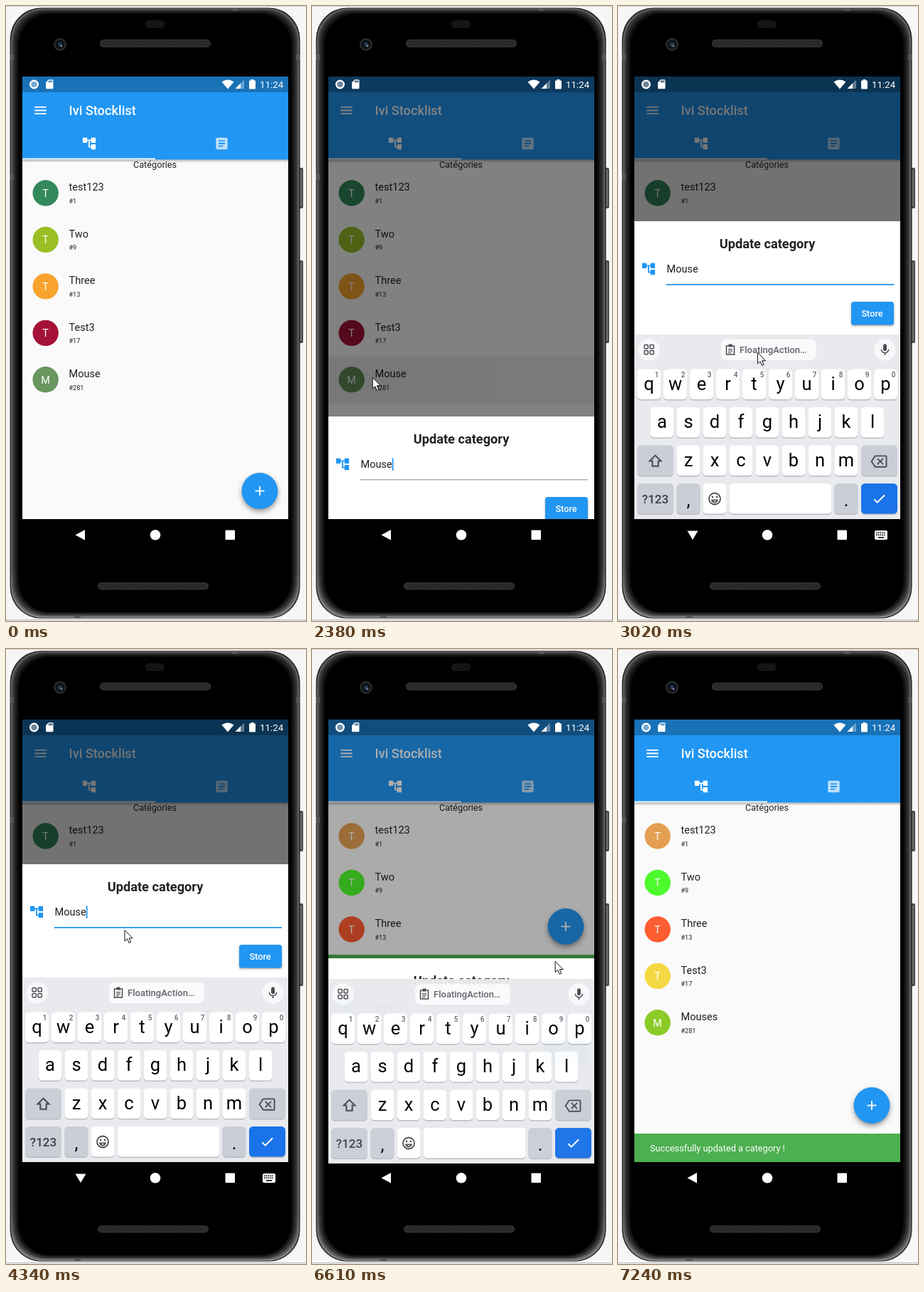
Animation, 422 px wide and 863 px high, one loop 8000 ms. Source, as an HTML page with a canvas:

```html
<!DOCTYPE html>
<html lang="en">
<head>
<meta charset="utf-8">
<title>Category update</title>
<style>
html, body { margin: 0; width: 100%; height: 100%; overflow: hidden; background: #f6f6f6; }
canvas { display: block; }
</style>
</head>
<body>
<canvas id="stage" width="422" height="863"></canvas>
<script>
const W = 422, H = 863, LOOP = 8000;
const LEFT = 23, TOP = 99, RIGHT = 397, BOTTOM = 720, SCREEN_END = 764;
const BAR_END = 215.4, KB_TOP = 461, SHEET_H = 159, SNACK_H = 40;
const BLUE = '#2196f3', INK = '#212121', GREY = '#4a4d51';
const OPEN = 2380, TYPED = 4680, CLOSE = 6540;

const ICONS = {
  menu: 'M3 18h18v-2H3v2zm0-5h18v-2H3v2zm0-7v2h18V6H3z',
  tree: 'M22 11V3h-7v3H9V3H2v8h7V8h2v10h4v3h7v-8h-7v3h-2V8h2v3z',
  article: 'M19 3H5c-1.1 0-2 .9-2 2v14c0 1.1.9 2 2 2h14c1.1 0 2-.9 2-2V5c0-1.1-.9-2-2-2zm-5 14H7v-2h7v2zm3-4H7v-2h10v2zm0-4H7V7h10v2z',
  card: 'M18 2h-8L4 8v12c0 1.1.9 2 2 2h12c1.1 0 2-.9 2-2V4c0-1.1-.9-2-2-2zm-6 6h-2V4h2v4zm3 0h-2V4h2v4zm3 0h-2V4h2v4z',
  mic: 'M12 14c1.66 0 3-1.34 3-3V5c0-1.66-1.34-3-3-3S9 3.34 9 5v6c0 1.66 1.34 3 3 3zm5.3-3c0 3-2.54 5.1-5.3 5.1S6.7 14 6.7 11H5c0 3.4 2.7 6.2 6 6.7V21h2v-3.3c3.3-.5 6-3.3 6-6.7z',
  check: 'M9 16.17L4.83 12l-1.42 1.41L9 19 21 7l-1.41-1.41z',
  erase: 'M22 3H7c-.7 0-1.2.35-1.6.9L0 12l5.4 8.1c.4.55.9.9 1.6.9h15c1.1 0 2-.9 2-2V5c0-1.1-.9-2-2-2zm0 16H7.07L2.4 12l4.66-7H22v14zm-11.6-2L14 13.4l3.6 3.6 1.4-1.4-3.6-3.6L19 8.4 17.6 7 14 10.6 10.4 7 9 8.4l3.6 3.6L9 15.6z',
  shift: 'M12 3L2 13h5v7h10v-7h5zM12 5.8l5.2 5.2H15v7H9v-7H6.8z'
};
for (const name in ICONS) ICONS[name] = new Path2D(ICONS[name]);

const ROWS = [
  ['test123', '#1', '#33885c', '#e49f52'],
  ['Two', '#9', '#9abf25', '#4dfa2c'],
  ['Three', '#13', '#f7a32e', '#fd5b30'],
  ['Test3', '#17', '#a51238', '#f4d843'],
  ['Mouse', '#281', '#67965f', '#8acb25']
];

// Keyframes: [time, value, value...], linear between them.
const CURSOR = [
  [210, 386, 837], [500, 270, 650], [760, 165, 515], [990, 120, 471], [1150, 96, 498],
  [1300, 82.5, 520], [1530, 84.5, 521], [2380, 84.5, 521], [2780, 192.5, 482], [3090, 197, 487],
  [3240, 190, 460], [3390, 171, 409], [3560, 169, 402], [3790, 166.5, 394], [4340, 166.5, 394],
  [4560, 165, 390], [4960, 165, 390], [5350, 341.5, 437], [6610, 341.5, 437], [7100, 390, 783]
];
const SHEET = [[OPEN, .906], [2460, 1], [6500, 1], [6610, .17], [6680, 0]];
const SCRIM = [[OPEN, .487], [2460, .54], [6500, .54], [6610, .32], [6770, 0]];
const KB_SHIFT = [[2700, 259], [2780, 65], [2860, 12], [2940, 0], [6570, 0], [6610, 1], [6690, 65], [6790, 259]];
const KB_ALPHA = [[2700, 0], [2780, .5], [2860, .9], [2940, 1], [6570, 1], [6610, .98], [6690, .5], [6770, 0]];
const INSET = [[2800, 0], [2860, 259], [6650, 259], [6700, 0]];
const SNACK = [[CLOSE, 0], [6610, 32], [6690, SNACK_H]];
const RIPPLE = [[1840, 30], [2000, 68], [2379, 68], [OPEN, 172], [2600, 330]];

function track(keys, t) {
  const next = keys.findIndex(k => k[0] > t);
  if (next === 0) return keys[0].slice(1);
  if (next < 0) return keys[keys.length - 1].slice(1);
  const a = keys[next - 1], b = keys[next];
  const p = (t - a[0]) / (b[0] - a[0]);
  return a.slice(1).map((v, i) => v + (b[i + 1] - v) * p);
}
const value = (keys, t) => track(keys, t)[0];

const stage = document.getElementById('stage').getContext('2d');
let c = stage;

function layer(draw) {
  const el = document.createElement('canvas');
  el.width = W;
  el.height = H;
  c = el.getContext('2d');
  draw();
  c = stage;
  return el;
}

function rect(x, y, w, h, fill) {
  c.fillStyle = fill;
  c.fillRect(x, y, w, h);
}

function round(x, y, w, h, r, fill) {
  c.beginPath();
  c.roundRect(x, y, w, h, r);
  c.fillStyle = fill;
  c.fill();
}

function disc(x, y, r, fill) {
  c.beginPath();
  c.arc(x, y, r, 0, 7);
  c.fillStyle = fill;
  c.fill();
}

function poly(points, fill) {
  c.beginPath();
  points.forEach(([x, y]) => c.lineTo(x, y));
  c.closePath();
  c.fillStyle = fill;
  c.fill();
}

function text(str, x, y, size, fill, weight = 400, align = 'left') {
  c.font = `${weight} ${size}px Roboto, sans-serif`;
  c.textAlign = align;
  c.fillStyle = fill;
  c.fillText(str, x, y);
}

function icon(name, x, y, size, fill) {
  c.save();
  c.translate(x - size / 2, y - size / 2);
  c.scale(size / 24, size / 24);
  c.fillStyle = fill;
  c.fill(ICONS[name], 'evenodd');
  c.restore();
}

function shadow(blur, dy, alpha, draw) {
  c.save();
  c.shadowColor = `rgba(0,0,0,${alpha})`;
  c.shadowBlur = blur;
  c.shadowOffsetY = dy;
  draw();
  c.restore();
}

function clipped(x, y, w, h, draw) {
  c.save();
  c.beginPath();
  c.rect(x, y, w, h);
  c.clip();
  draw();
  c.restore();
}

function vertical(y0, y1, ...colours) {
  const g = c.createLinearGradient(0, y0, 0, y1);
  colours.forEach((col, i) => g.addColorStop(i / (colours.length - 1), col));
  return g;
}

function grille(x, y, w, h) {
  round(x, y, w, h, h / 2, '#363636');
  c.save();
  c.beginPath();
  c.roundRect(x + 1, y + 1, w - 2, h - 2, h / 2);
  c.clip();
  c.strokeStyle = '#111';
  c.lineWidth = 1;
  for (let i = -h; i < w; i += 3) {
    c.beginPath();
    c.moveTo(x + i, y + h);
    c.lineTo(x + i + h / 2, y + h / 2);
    c.lineTo(x + i, y);
    c.stroke();
  }
  c.restore();
}

function drawPhone() {
  rect(0, 0, W, H, '#f6f6f6');
  rect(0, 0, W, 1, '#d2d2d2');
  rect(0, 861, W, 1, '#b4b4b4');
  for (const [y, h] of [[227, 57], [357, 116]]) {
    round(412, y, 6, h, 2, '#4a4a4a');
    rect(414, y + 3, 2, h - 6, '#707070');
  }
  const rim = [[0, '#262626', '#3a3a3a'], [1.5, '#606060', '#8c8c8c'], [3.5, '#3a3a3a', '#666'],
    [6, '#242424', '#3c3c3c'], [9, '#101010', '#1c1c1c'], [12, '#000', '#000']];
  for (const [d, side, base] of rim) {
    round(5.6 + d, 2.5 + d * .7, 408 - 2 * d, 857 - 1.4 * d, 44, vertical(790, 858, side, base));
  }
  for (const y of [68, 236]) rect(6, y, 5, 8, '#555');
  rect(408, 68, 5, 8, '#555');
  rect(318, 3, 9, 4, '#555');
  rect(96, 855, 9, 4, '#555');
  round(196, 20, 27, 11, 5.5, '#151515');
  disc(76, 54, 9, '#2a2a2a');
  disc(76, 54, 6.5, '#0d1118');
  disc(76, 54, 3, '#26384c');
  disc(78, 56, 1.5, '#6d8299');
  grille(132, 47, 156, 11);
  grille(129, 809, 156, 10);
}

function key(x, y, w, fill) {
  round(x, y + 1, w, 43, 5.5, '#b9bcc2');
  round(x, y, w, 42.5, 5.5, fill);
}

function letter(ch, x, y) {
  text(ch, x, y, 25.5, '#000', 400, 'center');
}

function drawKeyboard() {
  const shade = '#cbced6';
  rect(LEFT, KB_TOP, RIGHT - LEFT, SCREEN_END - KB_TOP, '#e8eaed');
  disc(43.5, 482.5, 15.2, '#f7f8fa');
  disc(375.5, 482.5, 15.2, '#f7f8fa');
  c.strokeStyle = GREY;
  c.lineWidth = 1.5;
  for (const x of [37, 45]) for (const y of [475.5, 483.5]) {
    c.beginPath();
    c.roundRect(x, y, 5.3, 5.3, 1.3);
    c.stroke();
  }
  icon('mic', 375.5, 482.5, 20, GREY);
  round(145, 467.5, 134, 29.5, 8, '#f9fafb');
  c.strokeRect(152.5, 477, 11, 12);
  rect(155.5, 474.5, 5, 4, GREY);
  for (const y of [481, 483.5, 486]) rect(155, y, y > 485 ? 4 : 6, 1.2, GREY);
  text('FloatingAction…', 171, 487, 13, '#5f6368', 500);

  [...'qwertyuiop'].forEach((ch, i) => {
    const x = 27 + 37 * i;
    key(x, 509.5, 33, '#fff');
    letter(ch, x + 16.5, 539);
    text((i + 1) % 10, x + 27.5, 520.5, 10, '#5f6368', 500, 'center');
  });
  [...'asdfghjkl'].forEach((ch, i) => {
    key(45.5 + 37 * i, 563, 33, '#fff');
    letter(ch, 62 + 37 * i, 592);
  });
  [...'zxcvbnm'].forEach((ch, i) => {
    key(82.5 + 37 * i, 616.5, 33, '#fff');
    letter(ch, 99 + 37 * i, 646);
  });
  key(27, 616.5, 51, shade);
  icon('shift', 52.5, 638.5, 25, GREY);
  key(342, 616.5, 51, shade);
  icon('erase', 367, 639, 23, GREY);

  key(27, 670, 51, shade);
  text('?123', 52.5, 698, 17, '#3c4043', 500, 'center');
  key(82.5, 670, 33, shade);
  letter(',', 99, 702);
  key(119.5, 670, 33, '#fff');
  c.strokeStyle = GREY;
  c.lineWidth = 1.8;
  c.beginPath();
  c.arc(136, 691.5, 8, 0, 7);
  c.stroke();
  disc(133, 689, 1.3, GREY);
  disc(139, 689, 1.3, GREY);
  c.beginPath();
  c.arc(136, 692.5, 4, .2, 2.94);
  c.closePath();
  c.stroke();
  key(156.5, 670, 144, '#fff');
  key(304.5, 670, 33, shade);
  letter('.', 321, 702);
  key(342, 670, 51, '#1a73e8');
  icon('check', 367.5, 691.5, 22, '#fff');
}

function drawBar() {
  rect(LEFT, TOP, 374, 22, '#1971b6');
  rect(LEFT, 121, 374, BAR_END - 121, BLUE);
  icon('menu', 48.5, 146.5, 22, '#fff');
  text('Ivi Stocklist', 88.5, 153, 18.2, '#fff', 500);
  icon('tree', 117, 193, 21.8, '#fff');
  icon('article', 303.5, 193, 21.8, 'rgba(255,255,255,.7)');
  rect(LEFT, BAR_END - 1.8, 187, 1.8, '#fff');
}

function drawStatus() {
  c.strokeStyle = '#fff';
  c.lineWidth = 2.4;
  c.beginPath();
  c.arc(39.5, 110, 5.3, 0, 7);
  c.stroke();
  disc(39.5, 110, 4.5, 'rgba(255,255,255,.4)');
  icon('card', 61.3, 109.8, 15.6, '#fff');
  c.beginPath();
  c.moveTo(312, 116.5);
  c.lineTo(303.5, 106.5);
  c.quadraticCurveTo(312, 100.5, 320.5, 106.5);
  c.fillStyle = '#fff';
  c.fill();
  poly([[322.5, 116], [335, 103.5], [335, 116]], 'rgba(255,255,255,.35)');
  poly([[322.5, 116], [330, 108.5], [330, 116]], '#fff');
  round(342, 104.5, 9, 12, 1, '#fff');
  rect(344.5, 103, 4, 2, '#fff');
  text('11:24', 357, 115, 13.3, '#fff');
}

function drawRowPress(t) {
  if (t < 1840 || t >= 2600) return;
  const fade = t < OPEN ? 1 : (2600 - t) / 220;
  const tint = a => `rgba(0,0,0,${a * fade})`;
  clipped(LEFT, 492, 374, 65.5, () => {
    if (t >= OPEN) rect(LEFT, 492, 374, 66, tint(.05));
    disc(85, 522, value(RIPPLE, t), tint(t < OPEN ? .05 : .02));
  });
}

function drawList(t) {
  const updated = t >= CLOSE;
  rect(LEFT, 215, 374, BOTTOM - 215, '#fafafa');
  text('Catégories', 209.5, 227.3, 12.73, INK, 400, 'center');
  ROWS.forEach(([name, tag, before, after], i) => {
    const y = 262.5 + 65.45 * i;
    disc(55.7, y, 18.2, updated ? after : before);
    text(name[0].toUpperCase(), 55.7, y + 5.2, 14.5, '#fff', 400, 'center');
    text(updated && i === 4 ? name + 's' : name, 88.5, y - 3.3, 14.55, INK);
    text(tag, 88.5, y + 14.3, 9.1, INK);
  });
  drawRowPress(t);
  rect(LEFT, 215, 374, 5, vertical(215, 220, 'rgba(0,0,0,.3)', 'rgba(0,0,0,0)'));
}

function drawFab(y) {
  shadow(7, 3.5, .4, () => disc(357, y, 25.4, BLUE));
  rect(350.5, y - .9, 13, 1.8, '#fff');
  rect(356.1, y - 6.5, 1.8, 13, '#fff');
}

function drawSheet(t, y) {
  rect(LEFT, y, 374, BOTTOM - y + 1, '#fff');
  text('Update category', 210, y + 38, 18.2, INK, 700, 'center');
  icon('tree', 43, y + 67, 21.8, BLUE);
  const word = t < TYPED ? 'Mouse' : 'Mouses';
  text(word, 68.5, y + 72.3, 14.55, INK);
  const blinkStart = t < TYPED ? 2320 : TYPED;
  if (Math.floor((t - blinkStart) / 500) % 2 === 0) {
    rect(68.5 + c.measureText(word).width, y + 58.5, 1.8, 17.5, BLUE);
  }
  if (t >= 2460) rect(68, y + 88, 320, 1.8, BLUE);
  else rect(68, y + 88.3, 320, 1, '#8a8a8a');
  shadow(3, 1.5, .35, () => round(328, y + 113, 60, 32.5, 3.6, BLUE));
  if (t >= 6140 && t < 6700) {
    clipped(328, y + 113, 60, 32.5, () =>
      disc(342, y + 135, 12 + (t - 6140) * .16, 'rgba(255,255,255,.2)'));
  }
  text('Store', 357.5, y + 133.8, 12.73, '#fff', 500, 'center');
}

function drawNav(keyboardOpen) {
  if (keyboardOpen) {
    poly([[97.5, 736.5], [112.5, 736.5], [105, 749]], '#fff');
    round(361, 736, 18, 13, 2, '#fff');
    for (let i = 0; i < 5; i++) for (const y of [738.5, 741.5]) rect(363 + 2.7 * i, y, 1.6, 1.6, '#000');
    rect(366, 745, 8, 1.6, '#000');
  } else {
    poly([[97.5, 742.3], [111, 735], [111, 749.5]], '#fff');
  }
  disc(210, 742.3, 7.3, '#fff');
  round(308.5, 735.5, 13.5, 13.5, 1, '#fff');
}

function drawCursor([x, y]) {
  c.save();
  c.translate(x + .5, y + .5);
  poly([[0, 0], [0, 15.5], [3.6, 12.2], [6, 18], [8.6, 17], [6.2, 11.3], [11, 11.3]], '#fff');
  c.strokeStyle = '#111';
  c.lineWidth = 1;
  c.stroke();
  c.restore();
}

const phone = layer(drawPhone);
const keyboard = layer(drawKeyboard);

function render(t) {
  const bottom = BOTTOM - value(INSET, t);
  const snack = value(SNACK, t);
  c.drawImage(phone, 0, 0);
  clipped(LEFT, TOP, RIGHT - LEFT, BOTTOM - TOP, () => {
    drawList(t);
    drawBar();
    drawFab(bottom - 39.5 - snack);
    if (snack > 0) {
      rect(LEFT, bottom - snack, 374, snack, '#4caf50');
      text('Successfully updated a category !', 45, bottom - snack + 24.5, 12.73, '#fff');
    }
    if (t >= OPEN && t < 6770) {
      rect(LEFT, TOP, 374, BOTTOM - TOP, `rgba(0,0,0,${value(SCRIM, t)})`);
      const open = value(SHEET, t);
      if (open > 0) drawSheet(t, Math.round(bottom - SHEET_H * open));
    }
    drawStatus();
  });
  const alpha = value(KB_ALPHA, t), shift = Math.round(value(KB_SHIFT, t));
  if (alpha > 0) {
    // The panel reaches behind the navigation bar only while it slides.
    const end = shift > 2 ? SCREEN_END : BOTTOM + shift;
    clipped(LEFT, TOP, RIGHT - LEFT, end - TOP, () => {
      c.globalAlpha = alpha;
      c.drawImage(keyboard, 0, shift);
    });
  }
  drawNav(t >= 2700 && t < 6600);
  if (t >= 210 && t < 7160) drawCursor(track(CURSOR, t));
}

function tick() {
  render(performance.now() % LOOP);
  requestAnimationFrame(tick);
}
tick();
</script>
</body>
</html>
```
